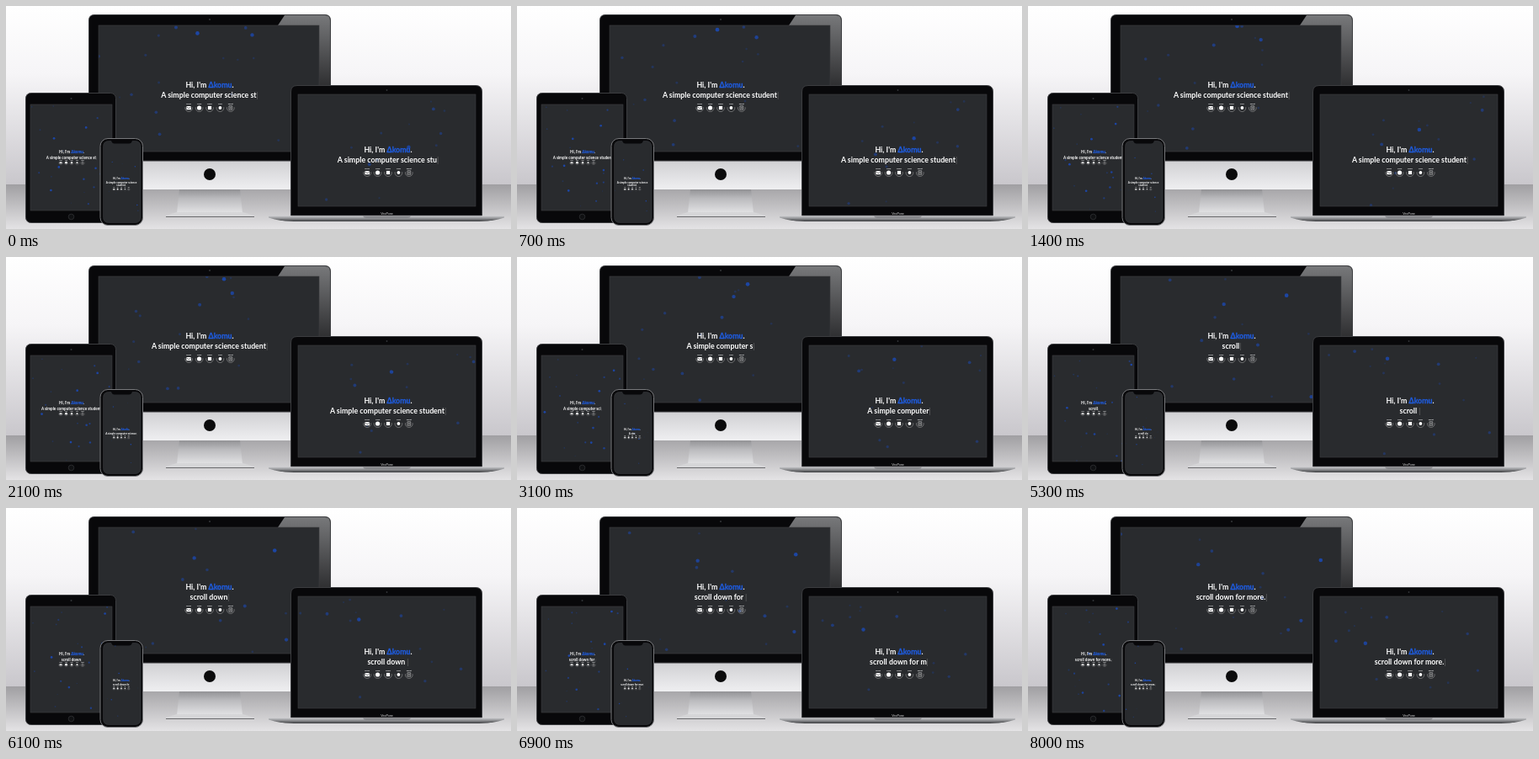
An HTML page that plays this animation: 600x265 px, repeating every 8.1 s.

```html
<!DOCTYPE html>
<html lang="en">
<head>
<meta charset="utf-8">
<title>Portfolio on four devices</title>
<style>
  html, body { margin: 0; width: 100%; height: 100%; overflow: hidden; background: #ddd; }
  svg { display: block; }
  #stage { width: 600px; height: 265px; }
  text { font-family: Lato, "Open Sans", sans-serif; font-weight: 700; text-anchor: middle; fill: #fff; white-space: pre; }
  .name { fill: #1f5ce0; stroke: #1f5ce0; stroke-width: .03em; }
  .caret { font-weight: 300; fill: #999; }
  .shell { fill: #08080a; stroke: #3c3d40; }
  .lens { fill: #34363a; }
</style>
</head>
<body>
<svg id="stage" viewBox="0 0 600 265">
  <defs>
    <linearGradient id="wall" x2="0" y2="1">
      <stop offset="0" stop-color="#fff"/><stop offset=".38" stop-color="#f6f5f7"/><stop offset="1" stop-color="#c9c7cc"/>
    </linearGradient>
    <linearGradient id="floor" x2="0" y2="1">
      <stop offset="0" stop-color="#a09fa2"/><stop offset="1" stop-color="#e4e3e5"/>
    </linearGradient>
    <linearGradient id="chin" x2="0" y2="1">
      <stop offset="0" stop-color="#d0d0d3"/><stop offset="1" stop-color="#efeff1"/>
    </linearGradient>
    <linearGradient id="stand" x2="0" y2="1">
      <stop offset="0" stop-color="#8f8f92"/><stop offset=".4" stop-color="#bababd"/><stop offset="1" stop-color="#e2e2e4"/>
    </linearGradient>
    <linearGradient id="shine" x2="0" y2="1">
      <stop offset="0" stop-color="#77787a"/><stop offset="1" stop-color="#08080a"/>
    </linearGradient>
    <linearGradient id="base" x2="0" y2="1">
      <stop offset="0" stop-color="#c8c9cc"/><stop offset=".45" stop-color="#909194"/><stop offset="1" stop-color="#3a3b3e"/>
    </linearGradient>
  </defs>

  <rect width="600" height="212" fill="url(#wall)"/>
  <rect y="212" width="600" height="53" fill="url(#floor)"/>

  <g id="desktop">
    <path d="M206 217H278L281 246H203Z" fill="url(#stand)"/>
    <path d="M203 245H281L295 249V251H190V249Z" fill="#d6d6d8"/>
    <path d="M190 250.5H295" stroke="#68696c"/>
    <path d="M98 184H386V212Q386 218 380 218H104Q98 218 98 212Z" fill="url(#chin)"/>
    <path class="shell" d="M98.5 184V17Q98.5 10.5 105 10.5H379Q385.5 10.5 385.5 17V184Z"/>
    <path d="M331 11H379Q385 11 385 17V140L372 112V23H323Z" fill="url(#shine)"/>
    <circle class="lens" cx="242" cy="16" r="1"/>
    <circle cx="242" cy="200" r="7" fill="#0b0b0c"/>
  </g>

  <g id="laptop">
    <path class="shell" d="M338.5 249V102Q338.5 94.5 346 94.5H558Q565.5 94.5 565.5 102V249Z"/>
    <circle class="lens" cx="452.5" cy="100" r=".9"/>
    <path d="M312 249.5H592V251.5Q578 256 562 256H342Q326 256 312 251.5Z" fill="url(#base)"/>
    <path d="M424 249.5H481Q480 252 477 252H428Q425 252 424 249.5Z" fill="#85868a"/>
    <text x="452.5" y="248" font-size="3.8" style="fill:#a8a8aa">VexPane</text>
  </g>

  <g id="tablet">
    <rect class="shell" x="23.5" y="103.5" width="107" height="154" rx="6"/>
    <circle class="lens" cx="77.5" cy="110" r="1"/>
    <circle cx="77.5" cy="250.5" r="3.3" fill="#101113" stroke="#3c3d40" stroke-width=".6"/>
  </g>

  <g id="phone">
    <rect x="112" y="157.5" width="50.5" height="103" rx="9" fill="#08080a" stroke="#77787b"/>
  </g>
  <path d="M125 160H150Q149 163.5 146 163.5H129Q126 163.5 125 160Z" fill="#08080a"/>
</svg>

<script>
const NS = "http://www.w3.org/2000/svg";
const LOOP = 8100;
const LINES = ["A simple computer science student", "scroll down for more."];
const WRAP = 25;
const KEYSTROKE = 160;
const BACKSPACE = 50;
const HOLD = 1700;
const DARK = "#292b2e";

// typed: letters already there at time zero; wait: pause before the second line.
const devices = [
  { id: "desktop", box: [110, 23, 262, 150], cx: 242, rows: [97.2, 108.9, 121], size: 8.8,
    typed: 28.7, wait: 300, dots: 18, dot: 2.4 },
  { id: "laptop", box: [347, 105, 211, 133], cx: 454, rows: [174.2, 185.8, 198], size: 8.8,
    typed: 29.5, wait: 180, dots: 14, dot: 2.4 },
  { id: "tablet", box: [29, 117, 97, 126], cx: 78, rows: [175, 182.3, 186.2], size: 4.6,
    typed: 28, wait: 180, dots: 20, dot: 1.4 },
  { id: "phone", box: [115.5, 160.5, 44.5, 97], cx: 137, rows: [206, 210.6, 214.5], size: 3.1,
    typed: 33, wait: 450, dots: 10, dot: .8, radius: 6, narrow: true }
];

function add(parent, tag, attrs = {}, content) {
  const el = document.createElementNS(NS, tag);
  for (const key in attrs) el.setAttribute(key, attrs[key]);
  if (content) el.textContent = content;
  return parent.appendChild(el);
}

function seeded(seed) {
  return () => (seed = (seed * 16807) % 2147483647) / 2147483647;
}

const glyphs = {
  email(g) {
    add(g, "rect", { x: -2.8, y: -2, width: 5.6, height: 4.2, rx: .5, fill: "#fff" });
    add(g, "path", { d: "M-2.7 -1.4L0 .7L2.7 -1.4", fill: "none", stroke: DARK, "stroke-width": .6 });
  },
  code: g => add(g, "circle", { r: 2.6, fill: "#fff" }),
  video: g => add(g, "rect", { x: -2.1, y: -2.1, width: 4.2, height: 4.2, fill: "#fff" }),
  clips: g => add(g, "circle", { r: 1.9, fill: "#fff" }),
  about: g => add(g, "path", {
    d: "M-1.9 -2.3H1.9V2.3H-1.9ZM-1 -.8H1M-1 .6H1", fill: "none", stroke: "#ccc", "stroke-width": .6
  })
};

function drawIcons(parent, d) {
  const row = add(parent, "g");
  Object.keys(glyphs).forEach((label, i) => {
    const x = d.cx + (i - 2) * d.size * 1.41;
    const g = add(row, "g", { transform: `translate(${x} ${d.rows[2]}) scale(${d.size / 8.8})` });
    add(g, "path", { d: "M-4.3 -.8A4.4 4.4 0 1 0 4.3 -.8", fill: "none", stroke: "#aaa", "stroke-width": .5 });
    add(g, "text", { y: -3.6, "font-size": 2.4 }, label);
    glyphs[label](g);
  });
  return row;
}

function scatter(view, d, rand) {
  const [, , width, height] = d.box;
  return Array.from({ length: d.dots }, () => {
    const angle = rand() * Math.PI * 2;
    const speed = d.dot * (4 + rand() * 6);
    const weight = rand();
    return {
      x: rand() * width, y: rand() * height,
      vx: Math.cos(angle) * speed, vy: Math.sin(angle) * speed,
      el: add(view, "circle", { r: d.dot * (.4 + .6 * weight), fill: "#1a4cc0", opacity: .2 + .7 * weight * weight })
    };
  });
}

function build(d, index) {
  const [x, y, width, height] = d.box;
  const frame = { x, y, width, height, rx: d.radius || 0 };
  const host = document.getElementById(d.id);
  const view = add(host, "svg", { x, y, width, height, viewBox: d.box.join(" "), overflow: "hidden" });
  add(view, "rect", { ...frame, fill: DARK });
  d.particles = scatter(view, d, seeded(731 + index * 97));

  const title = add(view, "text", { x: d.cx, y: d.rows[0], "font-size": d.size });
  add(title, "tspan", {}, "Hi, I'm ");
  add(title, "tspan", { class: "name" }, "Δkomu");
  add(title, "tspan", {}, ".");

  d.lines = [0, 1].map(i => {
    const line = add(view, "text", { x: d.cx, y: d.rows[1] + i * d.size, "font-size": d.size });
    return { words: add(line, "tspan"), caret: add(line, "tspan", { class: "caret" }) };
  });
  d.icons = drawIcons(view, d);
  add(host, "rect", { ...frame, fill: "none", stroke: "#3c3d40", "stroke-width": .6 });

  const [first] = LINES;
  d.wipe = (first.length - d.typed) * KEYSTROKE + HOLD;
  d.next = d.wipe + first.length * BACKSPACE + d.wait;
}

function typed(d, t) {
  const [first, second] = LINES;
  if (t >= d.next) return second.slice(0, Math.floor((t - d.next) / KEYSTROKE));
  if (t < d.wipe) return first.slice(0, Math.floor(d.typed + t / KEYSTROKE));
  return first.slice(0, Math.max(0, first.length - Math.floor((t - d.wipe) / BACKSPACE)));
}

// Reflects a coordinate between 0 and size.
function bounce(v, size) {
  const m = ((v % (2 * size)) + 2 * size) % (2 * size);
  return Math.min(m, 2 * size - m);
}

function render(t) {
  for (const d of devices) {
    const [x, y, width, height] = d.box;
    const s = t / 1000;
    for (const p of d.particles) {
      p.el.setAttribute("cx", x + bounce(p.x + p.vx * s, width));
      p.el.setAttribute("cy", y + bounce(p.y + p.vy * s, height));
    }

    const text = typed(d, t);
    const wraps = d.narrow && text.length > WRAP + 1;
    const parts = wraps ? [text.slice(0, WRAP), text.slice(WRAP + 1)] : [text, ""];
    d.lines.forEach((line, i) => {
      line.words.textContent = parts[i];
      line.caret.textContent = i === Number(wraps || 0) ? "|" : "";
    });
    d.icons.setAttribute("transform", `translate(0 ${wraps ? d.size : 0})`);
  }
}

devices.forEach(build);
const began = performance.now();
function tick() {
  render((performance.now() - began) % LOOP);
  requestAnimationFrame(tick);
}
tick();
</script>
</body>
</html>
```
